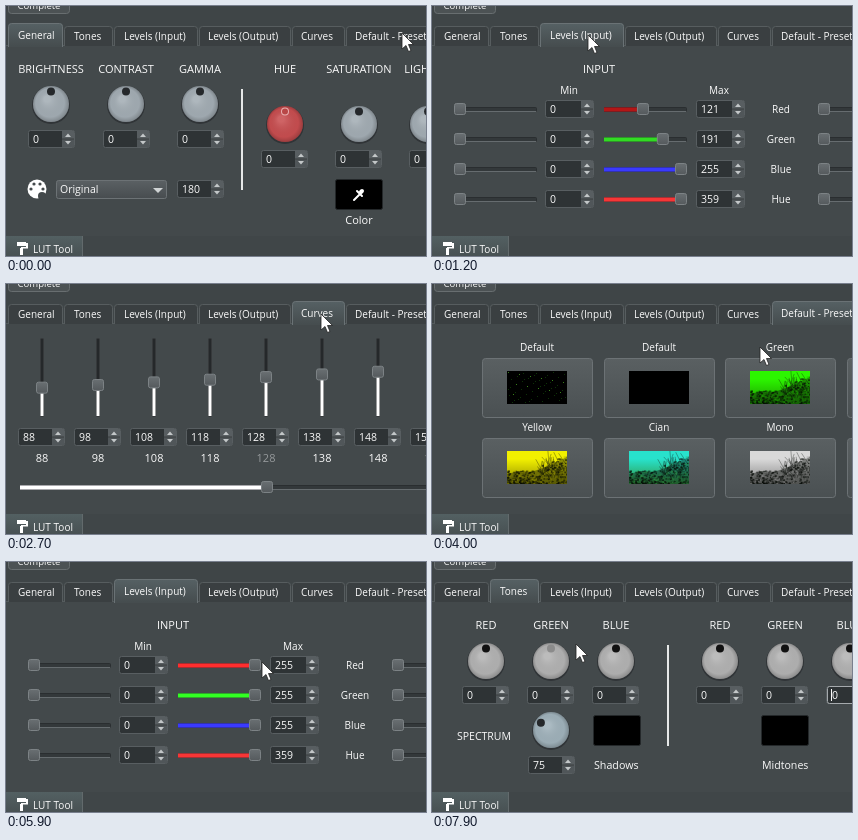
An HTML page with a canvas that plays this animation: 420 px wide and 250 px high, repeating every 8 s.

```html
<!DOCTYPE html>
<html lang="en">
<head>
<meta charset="utf-8">
<title>LUT Tool</title>
<style>
html, body { margin: 0; width: 100%; height: 100%; overflow: hidden; background: #43494b; }
canvas { display: block; }
</style>
</head>
<body>
<canvas id="stage" width="420" height="250"></canvas>
<script>
const ctx = document.getElementById('stage').getContext('2d');
const LOOP = 8000, STEP = 100;
const INK = '#fafafa', BACK = '#43494b', EDGE = '#585e61';

// [time, values...] with straight moves in between
const cursorPath = [
  [0, 396, 27], [400, 80, 30], [700, 80, 30], [1100, 156, 29], [1300, 156, 29],
  [1500, 218, 105], [1800, 256, 105], [1900, 249, 135], [2200, 256, 136],
  [2500, 315, 30], [3100, 315, 30], [3400, 383, 32], [3700, 383, 32],
  [4000, 328, 63], [4300, 317, 92], [4500, 317, 92], [4700, 304, 150],
  [4900, 219, 185], [5000, 219, 185], [5500, 131, 32], [5700, 131, 32],
  [5900, 256, 100], [6100, 256, 105], [6700, 227, 105], [6800, 227, 105],
  [7300, 82, 30], [7600, 82, 30], [7700, 92, 28], [7900, 144, 82]
];
const redLevel = [[0, 121], [1500, 121], [1800, 255], [6100, 255], [6700, 151]];
const greenLevel = [[0, 191], [1900, 191], [2200, 255]];
const pageChanges = [[0, 0], [600, 1], [1000, 2], [2500, 4], [3400, 5], [5700, 2], [7400, 1]];

function at(keys, t) {
  const next = keys.findIndex(k => k[0] > t);
  if (next < 0) return keys[keys.length - 1].slice(1);
  const a = keys[next - 1], b = keys[next], p = (t - a[0]) / (b[0] - a[0]);
  return a.slice(1).map((v, i) => v + (b[i + 1] - v) * p);
}

function text(s, x, y, { size = 10, align = 'left', color = INK } = {}) {
  ctx.font = `${size}px "Open Sans", sans-serif`;
  ctx.textAlign = align;
  ctx.fillStyle = color;
  ctx.fillText(s, x, y + 4);
}
const heading = (s, x, y = 63) => text(s, x, y, { size: 11, align: 'center' });

function rect(x, y, w, h, color) {
  ctx.fillStyle = color;
  ctx.fillRect(x, y, w, h);
}

function box(x, y, w, h, fill, stroke, radius = 2) {
  ctx.beginPath();
  ctx.roundRect(x + .5, y + .5, w - 1, h - 1, radius);
  ctx.fillStyle = fill;
  ctx.fill();
  ctx.strokeStyle = stroke;
  ctx.lineWidth = 1;
  ctx.stroke();
}

function shade(y0, y1, top, bottom) {
  const g = ctx.createLinearGradient(0, y0, 0, y1);
  g.addColorStop(0, top);
  g.addColorStop(1, bottom);
  return g;
}

function shape(points, color) {
  ctx.beginPath();
  points.forEach(([x, y]) => ctx.lineTo(x, y));
  ctx.closePath();
  ctx.fillStyle = color;
  ctx.fill();
}

function disc(x, y, r, color) {
  ctx.beginPath();
  ctx.arc(x, y, r, 0, 7);
  ctx.fillStyle = color;
  ctx.fill();
}

function spin(x, y, value, width = 47) {
  const right = x + width;
  box(x, y, width, 18, '#2e3335', EDGE);
  rect(right - 13, y + 1, 12, 8, '#585e61');
  rect(right - 13, y + 9, 12, 8, '#505659');
  rect(right - 13, y + 8.5, 12, 1, '#3a3f41');
  const c = right - 7;
  shape([[c - 3, y + 7], [c + 3, y + 7], [c, y + 3.5]], '#c3c7c8');
  shape([[c - 3, y + 11], [c + 3, y + 11], [c, y + 14.5]], '#c3c7c8');
  text(value, x + 5, y + 9, { size: 10.5 });
}

function dial(x, y, color, dot = '#25282b', angle = -Math.PI / 2, hollow = false) {
  disc(x, y + 1, 19, '#303437');
  disc(x, y, 18, color);
  const g = ctx.createRadialGradient(x - 4, y - 5, 3, x, y, 18);
  g.addColorStop(0, 'rgba(255,255,255,.12)');
  g.addColorStop(.75, 'rgba(0,0,0,.03)');
  g.addColorStop(1, 'rgba(0,0,0,.22)');
  disc(x, y, 18, g);
  const dx = x + 12.5 * Math.cos(angle), dy = y + 12.5 * Math.sin(angle);
  disc(dx, dy, 4, hollow ? '#e9b0b0' : dot);
  if (hollow) disc(dx, dy, 3, '#b84747');
}

function knob(x, y) {
  box(x - 6, y - 6, 12, 12, shade(y - 6, y + 6, '#6a7073', '#54595c'), '#7c8285');
}

function hSlider(x, y, w, knobX, fill) {
  box(x, y - 2, w, 5, '#33383a', '#2a2e30', 1);
  rect(x + 1, y + 2, w - 2, 1, '#666c6f');
  if (fill) {
    rect(x, y - 2, knobX - x, 5, fill);
    rect(x, y - 2, knobX - x, 1, 'rgba(40,40,50,.4)');
    rect(x, y + 2, knobX - x, 1, 'rgba(40,40,50,.4)');
  }
  knob(knobX, y);
}

function swatch(x, y) {
  box(x, y, 48, 31, '#000', '#24282a');
}

function divider() {
  rect(235, 83, 2, 101, '#e6e8e8');
}

function general() {
  [['BRIGHTNESS', 45], ['CONTRAST', 120], ['GAMMA', 194]].forEach(([name, x]) => {
    heading(name, x);
    dial(x, 98, '#a3adb4');
    spin(x - 23, 124, '0');
  });
  [['HUE', 279], ['SATURATION', 353], ['LIGHTNESS', 427]].forEach(([name, x], i) => {
    heading(name, x);
    dial(i === 2 ? 422 : x, 118, i ? '#a3adb4' : '#c84e50', '#25282b', -Math.PI / 2, !i);
    spin(x - 24, 144, '0');
  });
  divider();
  // palette
  disc(31, 183, 9.5, '#fff');
  [[25, 183], [28, 178], [34, 178], [37, 183]].forEach(([x, y]) => disc(x, y, 1.6, BACK));
  disc(36, 190, 4, BACK);
  box(50, 174, 111, 19, shade(174, 193, '#5b6164', '#474c4f'), '#6c7275');
  text('Original', 54, 183, { size: 10.5 });
  shape([[147, 182], [157, 182], [152, 187]], '#cfd3d4');
  spin(171, 174, '180');
  swatch(329, 173);
  // colour dropper
  ctx.strokeStyle = '#fff';
  ctx.lineCap = 'round';
  ctx.beginPath();
  ctx.lineWidth = 2;
  ctx.moveTo(348, 194);
  ctx.lineTo(354, 188);
  ctx.moveTo(351, 185);
  ctx.lineTo(356, 190);
  ctx.stroke();
  ctx.beginPath();
  ctx.lineWidth = 4;
  ctx.moveTo(355, 186);
  ctx.lineTo(356, 185);
  ctx.stroke();
  ctx.lineCap = 'butt';
  text('Color', 353, 214, { size: 11, align: 'center' });
}

function tones(t) {
  [54, 119, 184, 288, 353, 418].forEach((x, i) => {
    heading(['RED', 'GREEN', 'BLUE'][i % 3], x);
    dial(x, 99, '#b3b3b3', i === 1 && t >= 7800 ? '#8b8b8b' : '#111');
    spin(x - 24, 124, '0');
  });
  box(395, 124, 47, 18, '#2e3335', '#a5aaad');
  text('0', 400, 133, { size: 10.5 });
  rect(399, 127, 1, 12, INK);
  text('SPECTRUM', 25, 174, { size: 10.5 });
  dial(119, 168, '#a0b2bb', '#25282b', Math.PI * 1.2);
  spin(96, 194, '75');
  swatch(161, 153);
  swatch(329, 153);
  text('Shadows', 162, 203, { size: 10.7 });
  text('Midtones', 330, 203, { size: 10.6 });
  divider();
}

function levels(t) {
  const red = Math.round(at(redLevel, t)[0]), green = Math.round(at(greenLevel, t)[0]);
  const bright = v => 110 + v * .57;
  heading('INPUT', 167);
  text('Min', 137, 84, { align: 'center' });
  text('Max', 287, 84, { align: 'center' });
  [
    ['Red', red, 255, `rgb(${bright(red)},${red * .18},${red * .18})`],
    ['Green', green, 255, `rgb(50,${bright(green)},35)`],
    ['Blue', 255, 255, '#3a3aff'],
    ['Hue', 359, 359, '#f73636']
  ].forEach(([name, value, max, color], i) => {
    const y = 103 + 30 * i;
    hSlider(23, y, 82, 28, null);
    spin(113, y - 9, '0', 49);
    hSlider(172, y, 83, 249 - (1 - value / max) * 72.4, color);
    spin(264, y - 9, String(value), 49);
    text(name, 349, y, { align: 'center' });
    hSlider(386, y, 82, 392, null);
  });
}

function curves() {
  for (let i = 0; i < 8; i++) {
    const x = 36 + 56 * i, value = 88 + 10 * i, y = 127 - value * .265;
    box(x - 2, 54, 4, 79, '#25282a', '#36393b', 1);
    rect(x - 1.5, y, 3, 132 - y, '#fff');
    knob(x, y);
    spin(x - 24, 144, String(value));
    text(String(value), x, 174, { size: 11, align: 'center', color: value === 128 ? '#969a9c' : INK });
  }
  hSlider(14, 203, 440, 261, '#fff');
}

// Bright sky over blotchy undergrowth, bare trees on the right
function landscape(x, y, sky, haze) {
  let seed = 7;
  const random = () => (seed = seed * 16807 % 2147483647) / 2147483647;
  ctx.save();
  ctx.beginPath();
  ctx.rect(x, y, 60, 33);
  ctx.clip();
  rect(x, y, 60, 33, shade(y + 8, y + 33, sky, haze));
  shape([[0, 23], [12, 20], [24, 21], [36, 17], [60, 6], [60, 33], [0, 33]]
    .map(([px, py]) => [x + px, y + py]), 'rgba(10,16,10,.42)');
  for (let i = 0; i < 420; i++) {
    const px = random() * 60, depth = 1 - random() ** 1.4;
    const top = px > 34 ? 27 - px * .4 : 19;
    const py = 33 - (33 - top) * (1 - depth);
    const lit = random() < .22;
    ctx.globalAlpha = lit ? .5 : .25 + random() * .4;
    rect(x + px, y + py, 1 + random() * 1.5, 1 + random(), lit ? haze : '#060a06');
  }
  ctx.globalAlpha = .55;
  ctx.strokeStyle = '#0a0e0a';
  ctx.lineWidth = .6;
  for (let i = 0; i < 34; i++) {
    const px = x + 32 + random() * 28, py = y + 12 + random() * 16;
    ctx.beginPath();
    ctx.moveTo(px, py);
    ctx.lineTo(px + random() * 14 - 7, py - 4 - random() * 10);
    ctx.stroke();
  }
  ctx.restore();
}

function presetButton(x, y) {
  box(x, y, 111, 60, shade(y, y + 60, '#5a6062', '#4a5052'), '#6c7275', 3);
}

function presets() {
  [
    ['Default'], ['Default'], ['Green', '#2cf500', '#1c9a00'],
    ['Yellow', '#f2f000', '#8f8c00'], ['Cian', '#28e2cc', '#2f9440'], ['Mono', '#d9d9d9', '#858585']
  ].forEach(([name, sky, haze], i) => {
    const x = Math.round(50 + i % 3 * 121.5), y = i < 3 ? 74 : 154;
    text(name, x + 55, y - 11, { align: 'center' });
    presetButton(x, y);
    if (sky) return landscape(x + 25, y + 13, sky, haze);
    rect(x + 25, y + 13, 60, 33, '#000');
    if (i) return;
    for (let k = 0; k < 60; k++) {
      rect(x + 26 + k * 37 % 58, y + 14 + k * 19 % 31, 1, 1, k % 5 ? '#0e3208' : '#38801a');
    }
  });
  presetButton(415, 74);
  presetButton(415, 154);
}

const pages = { 0: general, 1: tones, 2: levels, 4: curves, 5: presets };
const tabs = [
  ['General', 2, 55, 12], ['Tones', 58, 49, 68], ['Levels (Input)', 108, 84, 118],
  ['Levels (Output)', 193, 92, 202], ['Curves', 286, 53, 295], ['Default - Presets', 340, 100, 349]
];

function frame(page) {
  rect(0, 0, 420, 250, BACK);
  rect(0, 0, 420, 40, '#3f4547');
  box(2, -14, 62, 22, '#4c5254', '#686e70', 3);
  text('Complete', 33, -1, { size: 9.5, align: 'center' });
  rect(0, 39, 420, 1, '#535a5c');
  tabs.forEach(([name, x, w, textX], i) => {
    const active = i === page, top = active ? 17 : 20;
    ctx.save();
    ctx.beginPath();
    ctx.rect(x, top, w, 40 - top + (active ? 1 : 0));
    ctx.clip();
    box(x, top, w, 30, active ? shade(top, 40, '#566164', '#464d4f') : '#3a3f41', active ? '#6a7275' : '#575d5f', 3);
    ctx.restore();
    text(name, textX, active ? 29 : 30);
  });
  rect(0, 230, 420, 20, '#404648');
  rect(0, 230, 77, 20, shade(230, 250, '#536062', '#485153'));
  rect(76, 230, 1, 20, '#626a6c');
  // paint roller
  rect(11, 236, 9, 4, '#fff');
  rect(20, 237, 2, 5, '#fff');
  rect(15, 241, 7, 1.5, '#fff');
  rect(14, 242, 3, 7, '#fff');
  text('LUT Tool', 27, 243);
}

function pointer(x, y) {
  const points = [[0, 0], [0, 16], [4, 12.5], [6.5, 18.5], [9, 17.5], [6.5, 11.5], [11.5, 11.5]]
    .map(([px, py]) => [x + px, y + py]);
  shape(points, '#fff');
  ctx.strokeStyle = '#222';
  ctx.lineWidth = .8;
  ctx.stroke();
}

function draw(now) {
  const t = Math.floor(now % LOOP / STEP) * STEP;
  const page = pageChanges.filter(([start]) => start <= t).pop()[1];
  frame(page);
  pages[page](t);
  pointer(...at(cursorPath, t));
}

const start = performance.now();
function tick() {
  draw(performance.now() - start);
  requestAnimationFrame(tick);
}
tick();
</script>
</body>
</html>
```
